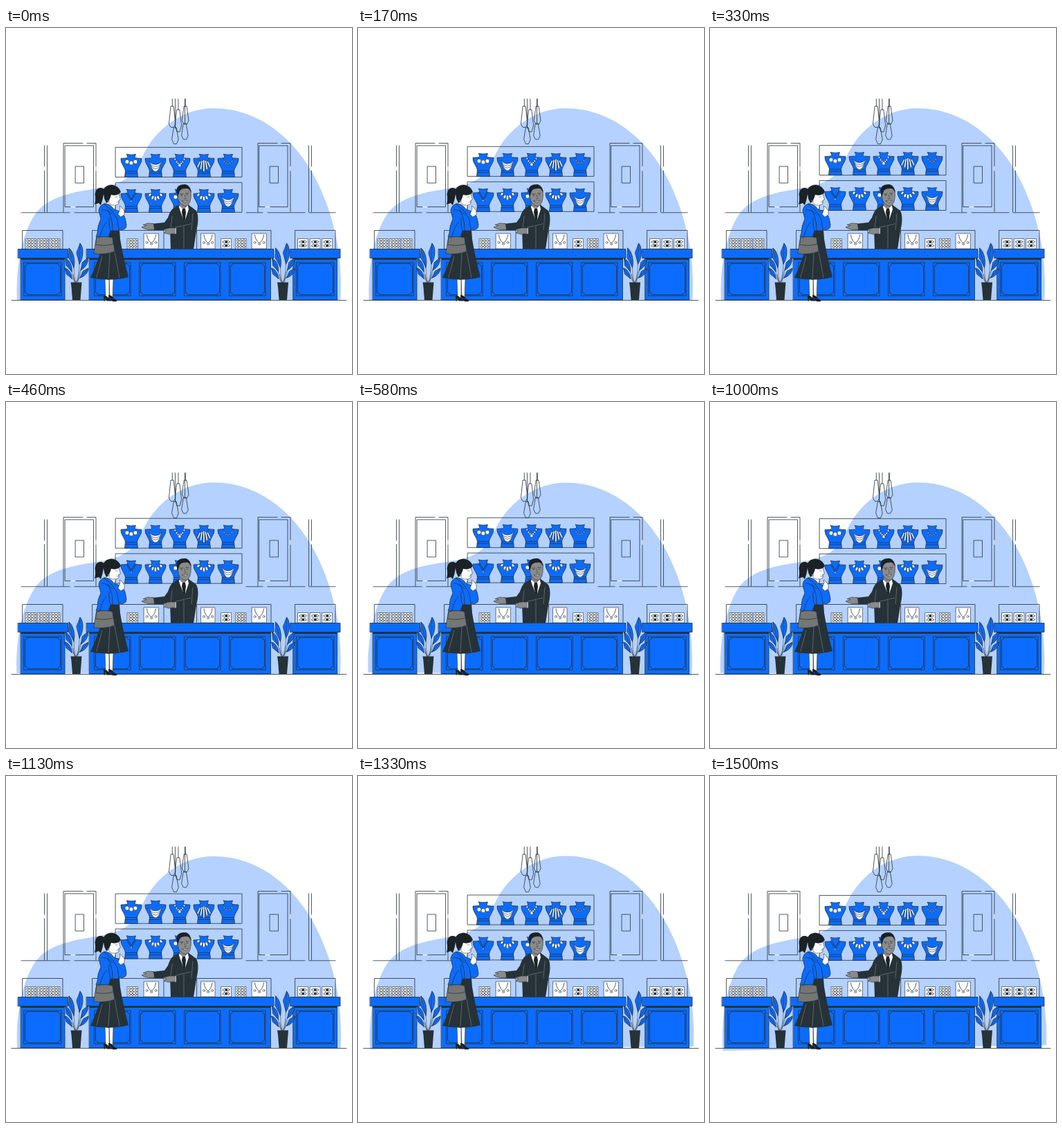
Write an HTML page that moves like this. It is 500 px wide and 500 px high and loops after 1.54 s.

```html
<!DOCTYPE html>
<html lang="en">
<head>
<meta charset="utf-8">
<title>Jewellery shop</title>
<style>
  html, body { margin: 0; height: 100%; overflow: hidden; background: #fff; }
  svg { display: block; width: 100vw; height: 100vh; }
  .line { fill: none; stroke: #263238; stroke-width: .8; }
  .thin { fill: none; stroke: #263238; stroke-width: .5; }
  .blue { fill: #0c6cff; stroke: #263238; stroke-width: .8; }
  .white { fill: #fff; stroke: #263238; stroke-width: .6; }
  .dark { fill: #263238; }
  .black { fill: #1b2226; }
  .skin { fill: #8b8b8b; stroke: #263238; stroke-width: .6; }
  .bag { fill: #757575; stroke: #263238; stroke-width: .7; }
  .fold { fill: none; stroke: #8d969c; stroke-width: .5; }
  .shine { fill: none; stroke: #fff; stroke-width: 1.2; }
</style>
</head>
<body>
<svg id="stage" viewBox="0 0 500 500" stroke-linejoin="round" stroke-linecap="round"></svg>
<script>
const LOOP = 1540;
const path = (cls, d) => `<path class="${cls}" d="${d}"/>`;
const rect = (cls, x, y, right, bottom) =>
  `<rect class="${cls}" x="${x}" y="${y}" width="${right - x}" height="${bottom - y}"/>`;
const dot = (cls, x, y, rx, ry = rx, turn = 0) =>
  `<ellipse class="${cls}" rx="${rx}" ry="${ry}" transform="translate(${x} ${y}) rotate(${turn})"/>`;
const at = (x, y, body) => `<g transform="translate(${x} ${y})">${body}</g>`;
const each = (list, draw) => list.map(draw).join('');

const blob = `<path id="blob" fill="#b4d1ff" d="M16 393C14 350 22 299 42 269
  C66 236 118 236 150 228C184 218 187 204 198 184C215 148 253 116 300 116
  C365 116 415 160 442 208C466 250 488 315 483.500 393Z"/>`;

const door = (x, inner) =>
  path('line', `M${x} 266V166.500H${x + 28}M${x + 34} 166.500H${x + 47}V266`) +
  rect('line', x + inner, 170, x + inner + 41, 258.5) +
  rect('line', x + 17.5, 200, x + 29.5, 224) +
  path('shine', `M${x + 11} 258.500h6M${x + 47} 200v6`);

const wall =
  each([55.5, 59.5, 437.5, 441.5], (x, i) =>
    path('line', i % 3 ? `M${x} 170V266` : `M${x} 170V200M${x} 206V266`)) +
  path('line', 'M22 266.800H92M99 266.800H158M347 266.800H371M378 266.800H432M438 266.800H476') +
  door(83, 2.5) + door(364, 2);

// x, top, widest point, bottom
const lamps = each([[240.3, 113, 139, 143.5], [249, 118, 141, 150], [259.3, 113, 134, 139],
  [244.5, 144, 161, 167.5], [258.5, 138, 156, 161]], ([x, top, wide, end]) =>
  path('line', `M${x} 102.500V${top}M${x - 1.8} ${top}H${x + 1.8}L${x + 4.7} ${wide}
    L${x + 2} ${end}H${x - 2}L${x - 4.7} ${wide}Z`));

const bust = path('blue', `M-6.500 -33Q0 -31.500 6.500 -33Q4.500 -28 6 -27.500L15 -27Q15.500 -22 12 -17
  Q9 -12 8.500 -9L9.500 0H-9.500L-8.500 -9Q-9 -12 -12 -17Q-15.500 -22 -15 -27L-6 -27.500Q-4.500 -28 -6.500 -33Z`) +
  path('line', 'M-8.500 -8.500H8.500M-8.500 -5.500H8.500');

const chain = path('thin', 'M-7 -28Q-6 -22 0 -18Q6 -22 7 -28');
const fan = (count, draw) => each([...Array(count).keys()], i => draw(i - (count - 1) / 2));
const band = i => {
  const y = 3 * i - 23, x = 10 - 1.3 * i;
  return path('white', `M${-x} ${y}Q0 ${y + 10} ${x} ${y}Q0 ${y + 18} ${-x} ${y}Z`);
};
const necklaces = {
  balls: chain + fan(3, i => dot('white', i * 6, -20.5 - Math.abs(i) * 1.6, 3)),
  bands: each([0, 1, 2], band),
  beads: chain + fan(7, i => dot('white', i * 2.2, -19 - i * i * .75, 1.4)) + dot('white', 0, -17, 2.2),
  spikes: chain + fan(5, i => path('white',
    `M${i * 2.5 - 1} ${-25 + Math.abs(i)}h2L${i * 4.6 + 1} ${-8 - Math.abs(i) * 3}h-2Z`)),
  fine: chain + fan(5, i => dot('white', i * 2.8, -19 - i * i * .9, 1)),
  vee: path('line', 'M-7 -28L0 -16L7 -28M-5 -28L0 -19L5 -28') + dot('white', 0, -16, 1.2),
  drops: chain + fan(5, i => dot('white', i * 4, -20 - i * i * 1.3, 1.8, 3.4 - Math.abs(i) * .5, -i * 20))
};
const shelf = (bottom, names) => rect('line', 158.5, bottom - 43, 341, bottom) +
  each(names, (name, i) => at(181 + i * 35, bottom, bust + necklaces[name]));
const shelves = `<g id="shelves">${
  shelf(215.5, ['balls', 'bands', 'beads', 'spikes', 'fine']) +
  shelf(266.4, ['vee', 'drops', 'balls', 'drops', 'bands'])}</g>`;

const ringBox = (x, w = 15) => rect('white', x, 304.5, x + w, 319) +
  each([...Array(9).keys()], i =>
    dot('line', x + w / 2 + (i % 3 - 1) * w * .3, 307.5 + (i / 3 | 0) * 4.2, 1.6));
const gemBox = x => rect('white', x, 304.5, x + 14.5, 319) +
  each([309, 314.5], y => path('line',
    `M${x + 2} ${y}l3 -2l2.300 2l2.300 -2l3 2l-3 2l-2.300 -2l-2.300 2z`) + dot('dark', x + 7.3, y, 2));
const chainBox = (x, w = 21) => rect('white', x, 297, x + w, 319) +
  path('line', `M${x + 4} 299Q${x + 5} 307 ${x + w / 2} 311Q${x + w - 5} 307 ${x + w - 4} 299`) +
  each([[4, 310], [w / 2, 312], [w - 4, 310]], ([dx, y]) => dot('white', x + dx, y, 1.5));

const cases = each([[24, 82], [125, 228], [276, 383], [418, 476]],
    ([x, right]) => rect('line', x, 292.5, right, 319.5)) +
  each([28.5, 46, 63], x => ringBox(x)) + ringBox(131) + ringBox(175.5) + chainBox(199.5) +
  chainBox(282, 20) + gemBox(311) + ringBox(332) + chainBox(355.5) +
  each([422, 439.5, 457], gemBox);

const panel = (x, right) => rect('line', x, 339, right, 387) + path('line',
  `M${x + 4.5} 340.500H${right - 4.5}A3 3 0 0 0 ${right - 1.5} 343.500V382.500A3 3 0 0 0 ${right - 4.5} 385.500
   H${x + 4.5}A3 3 0 0 0 ${x + 1.5} 382.500V343.500A3 3 0 0 0 ${x + 4.5} 340.500Z`);
const counter = (x, right, panels) =>
  rect('blue', x, 332.5, right, 393) + rect('dark', x, 332.5, right, 335) +
  rect('blue', x - 4, 319.5, right + 4.5, 332.5) + each(panels, ([a, b]) => panel(a, b));
const counters = counter(21.5, 85, [[26, 80]]) +
  counter(120.5, 382.5, [0, 1, 2, 3].map(i => [128 + i * 65, 180 + i * 65])) +
  counter(415, 478.5, [[420, 474]]);

const leaf = (x, y, tipX, tipY, w) => {
  const dx = tipX - x, dy = tipY - y, len = Math.hypot(dx, dy);
  const nx = -dy / len * w, ny = dx / len * w;
  const side = s =>
    `${x + dx * .3 + nx * s} ${y + dy * .3 + ny * s} ${x + dx * .8 + nx * s} ${y + dy * .8 + ny * s}`;
  return path('thin', `M${x} ${y}Q${x} 358 101 369`) +
    path('blue', `M${x} ${y}C${side(1)} ${tipX} ${tipY}C${side(-1)} ${x} ${y}Z`) +
    path('thin', `M${x} ${y}L${tipX} ${tipY}`);
};
const plant = leaf(106, 341, 107, 311, 6) + leaf(98, 346, 91, 318, 5) +
  leaf(108, 350, 118, 332, 4.5) + leaf(95, 352, 86, 333, 4.5) +
  leaf(107, 361, 119, 347, 4) + leaf(95, 362, 85, 347, 4) +
  path('dark', 'M93.500 367.500H109.500L109 374L107.500 393H96L94.500 374Z') +
  path('thin', 'M99 367L97 356M104 367L106 352');

const hands =
  path('skin', 'M213 283L205 282L198 284.500L203 285.500L196 288Q200 291 206 291.500L214 291Z') +
  path('skin', 'M244 289L236 289L226 291.500L232 293L228 296L235 298L244 297Z');

const head =
  path('skin', 'M247.500 236Q247 231 256 230Q266 230 266.500 238Q267 253 261 257Q255 259 250 252Q247 247 247.500 236Z') +
  path('black', 'M247.500 244Q244 234 247 230Q250 225.500 259 226Q266 228 267 238L265 235Q263 231 258 232Q252 232 250 236Z') +
  path('line', 'M251 240h4M259 239h4') + path('thin', 'M257 241l2 6h-2.500') +
  path('white', 'M253.500 250Q258 251 262 249Q259 254 253.500 250Z') +
  dot('black', 253, 242, .7) + dot('black', 261, 241.5, .7);

const man =
  path('skin', 'M250 250L251 260L257 267L263 258L262 248Z') +
  path('white', 'M250 256L248 264L257 284L265 264L263 255L257 262Z') +
  path('black', 'M255 261H259L260 266L258 286L254 266Z') +
  path('dark', `M249 256L240 262Q237 265 234 274L229 281L211 283L213 292L232 292L237 289
    L238 319.500H271L275 294Q280 273 275 264L263 255L264 262L258 280L252 265Z`) +
  path('white', 'M210 283L213 282.500L214.500 291.500L211 292Z') +
  path('line', 'M250 257L247 266L257 285L267 266L264 257') +
  path('white', 'M243 289L246 288.500V297.500L243 298Z') +
  path('dark', 'M246 288L268 284L270 294L246 298Z') +
  path('fold', 'M240 272L238 289M246 288L267 283M270 268L268 292M257 286V319') +
  at(.8, 0, head);

const woman =
  path('white', 'M143 362L144 389L149 391L149 364ZM149 362L150 389L154 391L155 362Z') +
  path('black', `M141 387Q145 386 148 390L154 394.500H146L143 390V394.500H141.500Z
    M148 386Q153 386 155 390L161 394Q160 396 154 395L150 390V394.500H148.500Z`) +
  path('dark', 'M148 292H164L165 305Q169 330 177 360Q151 367 122 361Q133 337 139 316Z') +
  path('fold', 'M150 325L148 362M156 318L164 361M139 330L131 360') +
  path('white', 'M145 246L144 261L156 266L159 254Z') +
  path('blue', `M142 254Q135 256 134 264L137 276Q132 286 132 296L130 302L148 303L151 293L164 293
    L163 291Q174 293 174 285Q173 274 168 266L161 264L156 262Q150 253 142 254Z`) +
  path('line', 'M142 255Q149 259 155 267L161 277L163 291M151 293Q148 285 149 274M139 262Q148 263 154 270') +
  path('dark', 'M153 293H163L164 304H155Z') +
  path('white', 'M162 269L165 261L164 257L167 259L171 264L171 270L166 273Z') +
  path('line', 'M147 263Q157 280 153 304M135 304Q139 287 145 281') +
  path('bag', 'M131 303Q143 300 154 303L157 323Q143 328 127 326Z') +
  path('bag', 'M131 303Q143 300 154 303L155 312Q142 316 130 313Z') +
  path('white', 'M145 238Q151 232 162 236L164 243L165.500 248L163 249L163 254Q160 257 153 256Q145 253 145 238Z') +
  path('black', `M140 238Q141 227 153 226.500Q163 228 166 237L163 240Q158 243 152 241Q150 249 146 253
    Q142 250 141 240Q140 248 137 256L134 253L128 255Q130 249 128.500 240Q130 230 138 231L142 233Z`) +
  path('thin', 'M158 244h3M160 252L163 251') + dot('white', 148, 250, 1);

document.getElementById('stage').innerHTML = blob + wall + lamps + shelves + man + cases + hands +
  path('line', 'M8 393.500H492') + counters + plant + at(298.5, 0, plant) + woman;

const blobNode = document.getElementById('blob');
const shelvesNode = document.getElementById('shelves');

function frame(now) {
  const t = now % LOOP;
  // The sway rests first, then swings linearly between +1 and -1 degree.
  const sway = t < 375 ? 0 : Math.asin(Math.sin((t - 375) / 1500 * 2 * Math.PI)) * 2 / Math.PI;
  const lift = -2.8 * (1 - Math.cos((t + 60) / LOOP * 2 * Math.PI));
  blobNode.setAttribute('transform', `rotate(${sway} 250 250)`);
  shelvesNode.setAttribute('transform', `translate(0 ${lift})`);
}

const start = performance.now();
function tick() {
  frame(performance.now() - start);
  requestAnimationFrame(tick);
}
tick();
</script>
</body>
</html>
```
